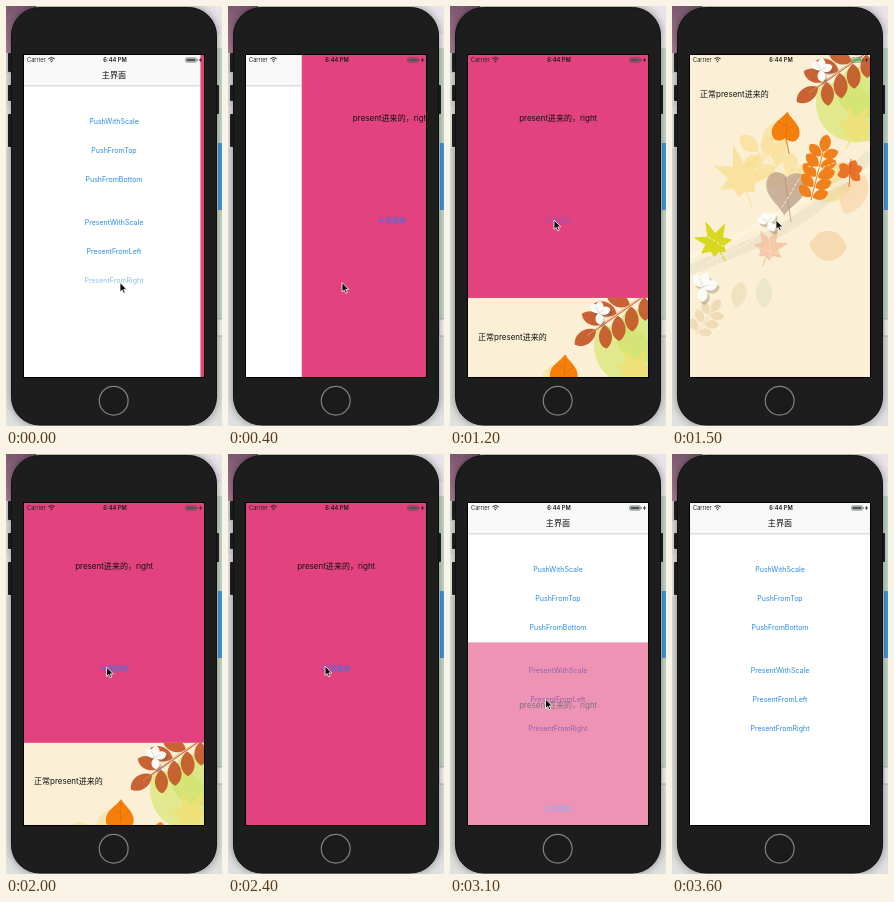
An HTML page for the animation above (3700 ms loop, 216 px wide and 420 px high).

```html
<!DOCTYPE html>
<html lang="zh">
<head>
<meta charset="utf-8">
<style>
html, body { margin: 0; width: 100%; height: 100%; overflow: hidden; background: #dcdedd; }
svg { display: block; width: 216px; height: 420px; }
text { font-family: Inter, "Noto Sans CJK SC", "Noto Sans CJK", sans-serif; }
</style>
</head>
<body>
<svg id="stage" viewBox="0 0 216 420" xmlns="http://www.w3.org/2000/svg"></svg>
<script>
const LOOP = 3700, STEP = 100;
const SCREEN = { w: 180, h: 322 };

const rect = (x, y, w, h, fill, more = '') =>
  `<rect x="${x}" y="${y}" width="${w}" height="${h}" fill="${fill}" ${more}/>`;
const path = (d, fill, more = '') => `<path d="${d}" fill="${fill}" ${more}/>`;
const line = (d, color, width, more = '') =>
  path(d, 'none', `stroke="${color}" stroke-width="${width}" ${more}`);
const label = (str, x, y, size, fill, more = '') =>
  `<text x="${x}" y="${y}" font-size="${size}" fill="${fill}" ${more}>${str}</text>`;
const mid = 'text-anchor="middle"';
const group = (id, body, more = '') => `<g id="${id}" ${more}>${body}</g>`;
const place = (x, y, angle, scale = 1) =>
  `transform="translate(${x} ${y}) rotate(${angle}) scale(${scale})"`;

// Foliage
function leaf(x, y, len, w, angle, fill, more = '') {
  const d = `M0 0C${w} ${-len * .25} ${w} ${-len * .8} 0 ${-len}C${-w} ${-len * .8} ${-w} ${-len * .25} 0 0Z`;
  return path(d, fill, `${place(x, y, angle)} ${more}`);
}

function spray(x, y, angle, pairs, gap, len, w, fill, opacity = 1) {
  let out = line(`M0 0V${-pairs * gap}`, fill, 1);
  for (let i = 0; i < pairs; i++) {
    const s = 1 - .25 * Math.abs(i / pairs - .4);
    for (const side of [-1, 1])
      out += leaf(side, -i * gap - 3, len * s, w * s, side * 58, fill);
  }
  out += leaf(0, -pairs * gap + 3, len, w, 0, fill);
  return `<g ${place(x, y, angle)} opacity="${opacity}">${out}</g>`;
}

function maple(x, y, r, angle, fill, opacity = 1) {
  let d = '';
  for (let i = 0; i < 14; i++) {
    const a = i * Math.PI / 7;
    const len = r * (i % 2 ? .4 : .78 + .22 * Math.cos(a));
    d += `${i ? 'L' : 'M'}${(Math.sin(a) * len).toFixed(1)} ${(-Math.cos(a) * len).toFixed(1)}`;
  }
  const stem = line(`M0 0L2 ${r * .95}`, fill, 1.2);
  return `<g ${place(x, y, angle)} opacity="${opacity}">${path(d + 'Z', fill, `stroke="${fill}" stroke-width="1.5" stroke-linejoin="round"`)}${stem}</g>`;
}

const heart = (x, y, r, angle, fill, opacity = 1) => path(
  'M0 1.1C-.3 .6-1 .3-.85-.4C-.7-.9-.2-.8 0-.55C.2-.8 .7-.9 .85-.4C1 .3 .3 .6 0 1.1Z',
  fill, `${place(x, y, angle, r)} opacity="${opacity}"`);

function flower(x, y, r, angle) {
  const petals = fill => [-55, -5, 60, 165]
    .map(a => leaf(0, 0, r, r * .45, a, fill)).join('');
  return `<g ${place(x + 2, y + 3, angle)} opacity=".3">${petals('#6b5a40')}</g>` +
    `<g ${place(x, y, angle)}>${petals('#fcfbf8')}${line(`M0 0L${-r * .4} ${-r * .5}M0 0L${r * .4} ${-r * .3}`, '#ccc8be', .5)}</g>`;
}

const dashes = d => line(d, '#fff8e6', 1, 'stroke-dasharray="3 2" opacity=".85"');

const leafPage = () => rect(18, 49, 180, 322, '#fbf0d5') +
  leaf(206, 132, 78, 36, -50, '#dce67c', 'opacity=".8"') +
  leaf(206, 112, 58, 34, -30, '#cfe46e', 'opacity=".75"') +
  maple(184, 122, 24, 30, '#f3df72', .75) +
  spray(130, 182, -50, 4, 15, 24, 10, '#f9e09a', .8) +
  maple(70, 172, 32, -15, '#f9df94', .8) +
  leaf(98, 152, 38, 17, 15, '#f9e2a0', 'opacity=".7"') +
  leaf(150, 196, 48, 22, 35, '#f8dd86', 'opacity=".7"') +
  leaf(173, 208, 46, 18, 22, '#f7d5a8', 'opacity=".65"') +
  leaf(137, 238, 38, 20, 95, '#f6d6aa', 'opacity=".8"') +
  spray(24, 328, 35, 3, 10, 15, 6, '#ead3a9', .7) +
  leaf(92, 302, 30, 11, 0, '#e2e2c2', 'opacity=".65"') +
  leaf(64, 302, 27, 10, 12, '#ecdcb6', 'opacity=".65"') +
  line('M18 264C72 240 132 228 198 148', '#dcd6bb', 11, 'opacity=".4"') +
  line('M18 250C70 234 120 195 198 164', '#fff8e8', 5, 'opacity=".55"') +
  heart(114, 184, 23, 4, '#c4a792', .85) +
  line('M113 172L119 216', '#b08f76', .7) +
  dashes('M88 222C112 207 119 183 130 169') +
  spray(196, 46, -125, 4, 16, 26, 9.5, '#c5592a', .93) +
  line('M196 46C177 56 157 72 137 87', '#e29a62', .7) +
  heart(114, 123, 16, 184, '#f57f0c') +
  line('M115 109L114 135M115 120L107 116M115 124L122 119', '#dc6908', .6) +
  line('M114 132L117 148', '#f57f0c', 1.2) +
  spray(139, 194, 14, 5, 10.5, 18, 7.5, '#f0801c') +
  [-55, -105, 25, 70, 130].map(a => leaf(178, 166, 13, 6, a, '#e8722a')).join('') +
  line('M179 153L177 181', '#d15c25', .8) +
  dashes('M136 160C154 168 170 149 198 139') +
  maple(43, 237, 22, -24, '#d9d820') +
  dashes('M27 228C38 230 47 239 59 244') +
  maple(97, 242, 20, 25, '#f4c3a0', .85) +
  line('M97 227L99 258M84 241L108 248', '#fae0c3', .7) +
  dashes('M24 268C40 246 68 250 91 224') +
  flower(149, 64, 12, 10) + flower(96, 216, 11, -20) + flower(31, 281, 15, 18) +
  label('正常present进来的', 28, 90.7, 8, '#111');

// Screens
const MENU = [['PushWithScale', 116], ['PushFromTop', 145], ['PushFromBottom', 174],
  ['PresentWithScale', 217], ['PresentFromLeft', 246], ['PresentFromRight', 275]];

const menuPage = () => rect(18, 49, 180, 322, '#fff') +
  rect(18, 49, 180, 31, '#f8f8f8') + rect(18, 79.6, 180, .6, '#b5b5b5') +
  label('主界面', 108, 72.1, 8.1, '#111', `${mid} font-weight="500"`) +
  MENU.map(([name, y]) => label(name, 108, y + 2.4, 7.02, '#2a8be8', `${mid} id="${name}"`)).join('');

const pinkPage = () => rect(18, 49, 180, 322, '#e2427d') +
  label('present进来的，right', 108.2, 114.8, 8.02, '#151015', mid) +
  label('正常跳转', 108.5, 217.4, 7.1, '#3476ee', `${mid} id="jump"`);

const statusBar = () =>
  label('Carrier', 21, 56.2, 5.7, '#222') +
  [1.6, 3.2].map(r => line(`M${45.5 - r} ${56 - r}Q45.5 ${54.5 - r * 1.4} ${45.5 + r} ${56 - r}`, '#222', 1)).join('') +
  path('M44.6 55.4Q45.5 54.5 46.4 55.4L45.5 56.5Z', '#222') +
  label('6:44 PM', 109, 56.2, 5.7, '#1a1a1a', `${mid} font-weight="600"`) +
  rect(179.7, 51.8, 10.6, 4.4, 'none', 'rx="1" stroke="#444" stroke-width=".5"') +
  rect(180.5, 52.6, 9, 2.8, '#4a5a50', 'id="charge"') + rect(190.9, 53.2, .7, 1.6, '#444') +
  path('M195 51.5L192.8 54.5H194.3L193.8 56.6L196.2 53.5H194.6Z', '#222');

const desktop = () => rect(0, 0, 216, 420, '#dfe0e0') +
  rect(0, 0, 30, 47, 'url(#dusk)') + rect(0, 47, 12, 20, '#cfd0d2') +
  rect(0, 100, 8, 42, '#e8e9e7') +
  rect(190, 0, 26, 28, '#e9e4e9') + rect(205, 28, 11, 286, '#c8dacd') +
  rect(205, 28, 11, 14, '#f0f0f0') + rect(212, 137, 4, 67, '#439bdc') +
  rect(211, 313, 8, 17, '#f5f5f5', 'stroke="#a9abab" stroke-width=".8"');

const body = (fill, more) => rect(5.5, 1.5, 205, 417.5, fill, `rx="28" ${more}`);

const phone = () => body('#000', 'opacity=".45" filter="url(#soft)"') +
  [[2, 47, 19], [2, 79, 16], [2, 108, 33], [208, 79, 29]]
    .map(([x, y, h]) => rect(x, y, 5, h, '#1c1c1d', 'rx="1"')).join('') +
  body('#1d1d1e', 'stroke="#111" stroke-width="1"') +
  rect(17, 48, 182, 324, '#000') +
  '<circle cx="107.7" cy="394.7" r="14.4" fill="#1b1b1c" stroke="#818181" stroke-width="1.2"/>';

const stage = document.getElementById('stage');
stage.innerHTML = `<defs>
  <clipPath id="glass">${rect(18, 49, 180, 322, '#000')}</clipPath>
  <filter id="soft" x="-20%" y="-20%" width="140%" height="140%"><feGaussianBlur stdDeviation="5"/></filter>
  <linearGradient id="dusk" x2="0" y2="1"><stop stop-color="#7a5870"/><stop offset="1" stop-color="#b17f9c"/></linearGradient>
  </defs>` + desktop() + phone() +
  `<g clip-path="url(#glass)">${menuPage()}${group('pink', pinkPage())}${group('leaves', leafPage(), 'clip-path="url(#glass)"')}${statusBar()}</g>` +
  group('cursor', path('M0 0V9.4L2.2 7.5L3.7 10.8L5.3 10.1L3.8 6.9H6.8Z', '#0a0a0a', 'stroke="#fff" stroke-width=".8"'));

// Motion
const $ = id => document.getElementById(id);
const clamp = v => Math.min(1, Math.max(0, v));
const easeInOut = (t, start) => (1 - Math.cos(Math.PI * clamp((t - start) / 748))) / 2;

function spring(t, start) {
  const k = Math.max(0, t - start) * .019;
  const p = 1 - (1 + k) * Math.exp(-k);
  return p > .985 ? 1 : p;
}

const POINTER = [[0, 114, 276.5], [600, 114, 276.5], [1000, 104, 214], [1800, 104, 214],
  [2200, 97, 212], [2800, 97, 212], [3100, 95.5, 245], [3500, 95.5, 245]];

function pointerAt(t) {
  const i = POINTER.findIndex(p => p[0] > t);
  if (i < 0) return null;
  const [t0, x0, y0] = POINTER[i - 1], [t1, x1, y1] = POINTER[i];
  const p = (t - t0) / (t1 - t0);
  return [x0 + (x1 - x0) * p, y0 + (y1 - y0) * p];
}

const move = (id, x, y) => $(id).setAttribute('transform', `translate(${x} ${y})`);
const fade = (id, opacity) => $(id).setAttribute('opacity', opacity);

function draw(t) {
  const pinkOut = easeInOut(t, 2758);
  move('pink', SCREEN.w * (1 - easeInOut(t, -67)), SCREEN.h * pinkOut);
  fade('pink', 1 - pinkOut);
  const leafDrop = 1 - spring(t, 1150) + spring(t, 1860);
  move('leaves', 0, SCREEN.h * leafDrop);
  $('charge').setAttribute('fill', leafDrop < .02 ? '#62b45c' : '#4a5a50');
  fade('PresentFromRight', t < 200 ? .55 : 1);
  fade('jump', t >= 1100 && t < 1400 ? .4 : 1);
  const at = pointerAt(t);
  fade('cursor', at ? 1 : 0);
  if (at) move('cursor', ...at);
}

const began = performance.now();
function tick() {
  const t = (performance.now() - began) % LOOP;
  draw(Math.floor(t / STEP) * STEP);
  requestAnimationFrame(tick);
}
draw(0);
requestAnimationFrame(tick);
</script>
</body>
</html>
```
